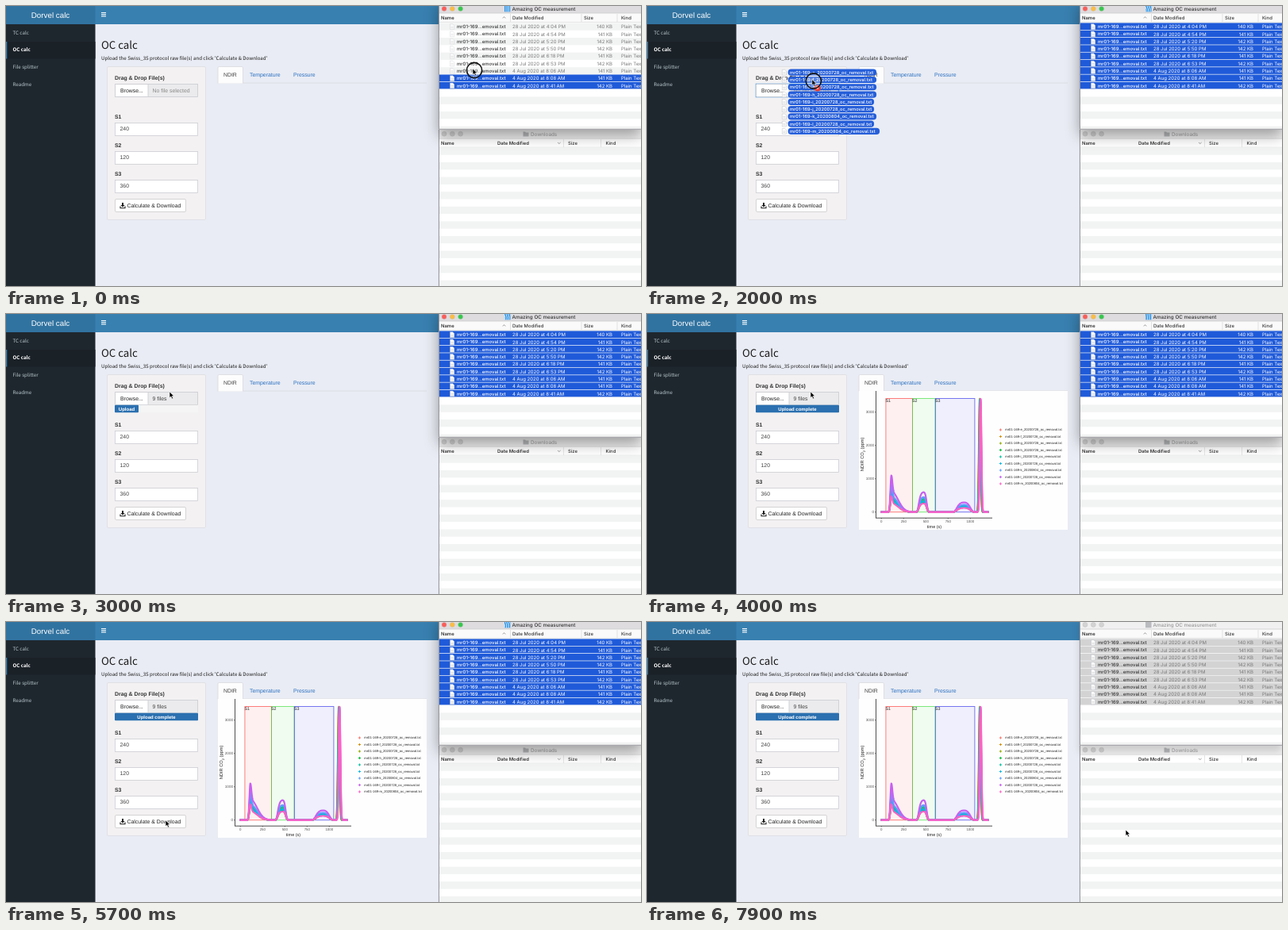
Write an HTML page that moves like this. It is 800 by 353 pixels and loops after 8000 ms.

```html
<!DOCTYPE html>
<html lang="en">
<head>
<meta charset="utf-8">
<title>OC calc</title>
<style>
html, body { margin: 0; width: 100%; height: 100%; overflow: hidden; background: #e9ecf4; }
svg { display: block; width: 800px; height: 353px; }
text { white-space: pre; text-rendering: geometricPrecision; }
.web { font-family: "Liberation Sans", Arial, sans-serif; }
.src { font-family: "Noto Sans CJK JP", "Noto Sans CJK SC", "Noto Sans CJK", "Open Sans", sans-serif; }
.mac { font-family: Inter, Roboto, sans-serif; }
</style>
</head>
<body>
<svg id="stage" viewBox="0 0 800 353" xmlns="http://www.w3.org/2000/svg"></svg>
<script>
const LOOP = 8000, STEP = 100, ROW = 9.3, ROW_TOP = 21.4, SELECTED = '#1f5ad9';
const stage = document.getElementById('stage');
const $ = id => document.getElementById(id);
const range = n => [...Array(n).keys()];

const rect = (x, y, w, h, fill, more = '') =>
  `<rect x="${x}" y="${y}" width="${w}" height="${h}" fill="${fill}" ${more}/>`;
const line = (x1, y1, x2, y2, color, width = 1) =>
  `<path d="M${x1} ${y1}L${x2} ${y2}" stroke="${color}" stroke-width="${width}"/>`;
const text = (face, x, mid, size, str, fill = '#333', more = '') =>
  `<text class="${face}" x="${x}" y="${mid + size * 0.36}" font-size="${size}" fill="${fill}" ${more}>${str}</text>`;
const BOLD = 'font-weight="700"', SEMI = 'font-weight="600"', MEDIUM = 'font-weight="500"';
const MIDDLE = 'text-anchor="middle"', END = 'text-anchor="end"';

// Measurement files
const clock = ['4:04', '4:54', '5:20', '5:50', '6:18', '6:53', '8:06', '8:08', '8:41'];
const sizes = [140, 141, 142, 142, 141, 142, 141, 141, 142];
const files = [...'efghijklm'].map((letter, i) => ({
  letter,
  name: `mr01-169-${letter}_2020${'km'.includes(letter) ? '0804' : '0728'}_oc_removal.txt`,
  date: i < 6 ? `28 Jul 2020 at ${clock[i]} PM` : `4 Aug 2020 at ${clock[i]} AM`,
  size: `${sizes[i]} KB`
}));
const fileIcon = (x, y) =>
  `<path d="M${x} ${y - 3.4}h3.4l1.8 1.8v5h-5.2z" fill="#fff" stroke="#b9bcc2" stroke-width=".5"/>` +
  line(x + 1, y, x + 4, y, '#bbb', .5) + line(x + 1, y + 1.5, x + 4, y + 1.5, '#bbb', .5);

function webPage() {
  const menu = ['TC calc', 'OC calc', 'File splitter', 'Readme'].map((label, i) =>
    text('src', 8.5, 33.5 + i * 21.7, 6.2, label, i === 1 ? '#fff' : '#b8c7ce', i === 1 ? SEMI : '')).join('');
  const field = (label, value, y) =>
    text('web', 137, y - 7.7, 6.9, label, '#333', BOLD) +
    rect(137.5, y + .5, 104, 16, '#fff', 'stroke="#ccced4" stroke-width=".8"') +
    text('web', 143.5, y + 8, 6.9, value, '#444');
  return rect(0, 0, 800, 353, '#e9ecf4') +
    rect(112, 0, 688, 23, '#3880b0') + rect(0, 0, 112.5, 23, '#3173a0') +
    rect(0, 23, 112.5, 330, '#1f272e') + rect(0, 45, 112.5, 21.5, '#1a2127') + rect(0, 45, 1.3, 21.5, '#3880b0') +
    text('web', 56, 11, 9.8, 'Dorvel calc', '#fff', MIDDLE) +
    [8.5, 10.7, 12.9].map(y => line(120, y, 126, y, '#fff', 1.1)).join('') + menu +
    text('src', 120, 49.3, 13.25, 'OC calc', '#1a1a1a') +
    text('src', 120, 65.9, 6.16, "Upload the Swiss_3S protocol raw file(s) and click 'Calculate &amp; Download'", '#1a1a1a') +
    rect(127.5, 76.5, 124, 193, '#f3f1f2', 'rx="1.5" stroke="#dedee2" stroke-width=".8"') +
    text('web', 137, 90.5, 6.9, 'Drag &amp; Drop File(s)', '#333', BOLD) +
    rect(137.5, 98.5, 104, 16, '#ebebed', 'stroke="#c9cbd0" stroke-width=".8" id="fileField"') +
    rect(137.5, 98.5, 41.5, 16, '#fff', 'stroke="#c9cbd0" stroke-width=".8" rx="1"') +
    text('web', 144, 106.3, 6.9, 'Browse...', '#222') + text('web', 184.5, 106.3, 6.9, '', '#777', 'id="fileNote"') +
    `<g id="progress">${rect(137, 114.8, 105, 9.4, '#f5f5f5')}${rect(137, 114.8, 30, 9.4, '#2b70b0', 'rx="1" id="bar"')}
     ${text('web', 152, 119.5, 6, 'Upload', '#fff', MIDDLE + ' id="barLabel" font-weight="700"')}</g>` +
    field('S1', 240, 147) + field('S2', 120, 183) + field('S3', 360, 219) +
    rect(137.5, 243.5, 89, 16, '#fff', 'rx="1.5" stroke="#ccc" stroke-width=".8"') +
    '<path d="M146 248h2v3h1.7l-2.7 2.6-2.7-2.6h1.7z" fill="#222"/><path d="M144 252.5v2.2h6v-2.2" fill="none" stroke="#222" stroke-width="1.1"/>' +
    text('web', 152.5, 251.3, 6.9, 'Calculate &amp; Download', '#222') +
    line(267, 97, 530, 97, '#d8dade', .8) +
    '<path d="M267 97.5V78q0-1.5 1.5-1.5H297q1.5 0 1.5 1.5V97.5" fill="#fdfdfe" stroke="#d8dade" stroke-width=".8"/>' +
    text('web', 274, 86.3, 6.9, 'NDIR', '#444') +
    text('web', 307, 86.3, 6.9, 'Temperature', '#2a6fc0') + text('web', 362, 86.3, 6.9, 'Pressure', '#2a6fc0');
}

// Chart
const px = t => 295.3 + t * 0.112, py = v => 249.7 - v * 0.042;
const bell = (t, mid, width) => Math.exp(-(((t - mid) / width) ** 2));
const hues = ['#F8766D', '#D39200', '#93AA00', '#00BA38', '#00C19F', '#00B9E3', '#619CFF', '#C860F0', '#FF61C3'];

function signal(t, gain, shift) {
  const burn = 620 * bell(t, 112, t < 112 ? 14 : 105) + 480 * bell(t, 112, 16);
  const second = 600 * Math.exp(-(((t - 465) / 48) ** 4)) * (1 - .15 * bell(t, 430, 25));
  const third = 290 * Math.exp(-(((t - 925) / 85) ** 4)) * (.8 + .2 * bell(t, 930, 60));
  return gain * (burn + second + third) + 3400 * bell(t, 1111 + shift, 13);
}

function chart() {
  const zone = (label, from, to, color) =>
    rect(px(from), 106.5, (to - from) * .112, 143.2, color, `fill-opacity=".07" stroke="${color}" stroke-opacity=".65" stroke-width="1"`) +
    text('web', px(from) - .5, 109.5, 5.3, label, '#222');
  const curve = (color, i) => {
    const gain = [.62, .5, .58, .47, .66, .54, .75, 1, .43][i];
    const d = range(401).map(k => `${px(k * 3).toFixed(2)} ${py(signal(k * 3, gain, (i - 4) * 1.4)).toFixed(2)}`).join('L');
    return `<path d="M${d}" fill="none" stroke="${color}" stroke-width="2.2" stroke-linejoin="round" stroke-linecap="round"/>`;
  };
  const xAxis = [0, 250, 500, 750, 1000].map(t => line(px(t), 257, px(t), 258.5, '#333', .6) +
    text('web', px(t), 261.5, 4.4, t, '#555', MIDDLE)).join('');
  const yAxis = [0, 1000, 2000, 3000].map(v => line(287, py(v), 288.5, py(v), '#333', .6) +
    text('web', 286, py(v), 4.6, v, '#555', END)).join('');
  const legend = files.map((f, i) => {
    const y = 146 + i * 8.5;
    return line(443.8, y, 447, y, hues[i], 1) + line(445.4, y - 1.6, 445.4, y + 1.6, hues[i], 1) +
      text('web', 451.3, y, 4.15, f.name, '#222');
  }).join('');
  return rect(267, 97, 263, 175, '#fefefe') +
    zone('S1', 50, 350, '#ff3b3b') + zone('S2', 350, 605, '#3bdd3b') + zone('S3', 608, 1050, '#3030e8') +
    hues.map(curve).join('') + line(288.5, 97, 288.5, 257.5, '#222', .8) + line(288.5, 257.2, 435, 257.2, '#222', .8) +
    xAxis + yAxis + text('web', 362, 267.7, 5.5, 'time (s)', '#222', MIDDLE) +
    `<text class="web" transform="translate(273.3 177) rotate(-90)" font-size="5.7" fill="#222" ${MIDDLE}>NDIR CO<tspan font-size="4" dy="1.2">2</tspan><tspan dy="-1.2"> (ppm)</tspan></text>` +
    legend;
}

// File windows
const lights = (y, id) => [552, 562.3, 572.6].map((x, i) =>
  `<circle id="${id}${i}" cx="${x}" cy="${y}" r="3" fill="#d3d3d3" stroke="#bdbdbd" stroke-width=".4"/>`).join('');
const stripes = (top, bottom) => range(Math.ceil((bottom - top) / ROW)).filter(i => i % 2 === 0).map(i =>
  rect(546, top + i * ROW, 254, Math.min(ROW, bottom - top - i * ROW), '#f2f3f3')).join('');
const heads = (y, cols) => cols.map(([label, x, weight]) => text('mac', x, y, 5.9, label, '#333', weight)).join('');

function downloadsWindow() {
  return rect(545, 156, 255, 197, '#fff') + rect(545, 156, 255, 11, '#f1f0f1') + lights(161.2, 'back') +
    '<path d="M651.5 158.5h2.5l1 1h3.5v5h-7z" fill="#b5b7ba"/>' +
    text('mac', 661, 161.3, 6.3, 'Downloads', '#999') +
    line(545, 167.2, 800, 167.2, '#d5d5d5', .7) + line(545, 178.2, 800, 178.2, '#ddd', .7) +
    [702.5, 749.5].map(x => line(x, 168, x, 178, '#ddd', .7)).join('') +
    heads(172.7, [['Name', 548, SEMI], ['Date Modified', 619, SEMI], ['Size', 708, MEDIUM], ['Kind', 755.5, MEDIUM]]) +
    '<path d="M695 172l1.8 1.6 1.8-1.6" fill="none" stroke="#777" stroke-width=".7"/>' +
    stripes(178.4, 353) + line(545.4, 156, 545.4, 353, '#8e9096');
}

function filesWindow() {
  const rows = files.map((f, i) => {
    const top = ROW_TOP + i * ROW, mid = top + ROW / 2;
    return `<g id="row${i}">${rect(546, top, 254, ROW - .7, 'none')}<g>${fileIcon(559.5, mid)}</g>` +
      text('mac', 568, mid, 5.95, 'mr01-169…emoval.txt', '#333', MEDIUM) + text('mac', 638, mid, 6, f.date) +
      text('mac', 764, mid, 6, f.size, '#333', END) + text('mac', 775, mid, 6, 'Plain Text') + '</g>';
  }).join('');
  return rect(545, -8, 255, 163.5, '#fff') + rect(545, 0, 255, 9, '#dedcdf', 'id="titleBar"') + lights(3.4, 'front') +
    `<g clip-path="url(#folderClip)">${rect(627, 0, 9, 8, '#3a9be8', 'id="folder"')}
     <path id="sheen" fill="none" stroke="#d9f0ff" stroke-width="1"/></g>` +
    text('mac', 637.5, 3.8, 6.25, 'Amazing OC measurement', '#333', MEDIUM + ' id="frontTitle"') +
    rect(545, 9, 255, 11.4, '#fafafa') + line(545, 9, 800, 9, '#c8c8c8', .7) + line(545, 20.4, 800, 20.4, '#ddd', .7) +
    [635.5, 725, 770].map(x => line(x, 10, x, 20, '#d6d6d6', .7)).join('') +
    heads(14.7, [['Name', 548, SEMI], ['Date Modified', 638, MEDIUM], ['Size', 728, MEDIUM], ['Kind', 775, MEDIUM]]) +
    '<path d="M625.7 15.3l1.8-1.6 1.8 1.6" fill="none" stroke="#777" stroke-width=".7"/>' +
    stripes(ROW_TOP, 155) + rows + line(545, 155.3, 800, 155.3, '#8c8d92', .9) + line(545.4, 0, 545.4, 155, '#8e9096');
}

// Dragged labels, placed relative to the pointer tip
function dragGhost() {
  return files.map((f, i) => {
    const y = -8.8 + i * 9.28;
    const w = 111.5 + (f.letter === 'm' ? 4 : 'ijl'.includes(f.letter) ? -3 : 0);
    return fileIcon(-37.5, y) + rect(-30.2, y - 4.1, w, 8.2, SELECTED, 'rx="4"') + text('mac', -27.7, y, 5.7, f.name, '#fff', MEDIUM);
  }).join('') + '<circle cx="7" cy="11" r="4" fill="#ee3b30"/>' + text('mac', 7, 11, 5.5, '9', '#fff', MIDDLE);
}

stage.innerHTML = `<defs>
  <clipPath id="folderClip"><path d="M628 0h7.5v7.3h-7.5z"/></clipPath>
  <filter id="shade" x="-30%" y="-30%" width="160%" height="170%"><feDropShadow id="drop" dx="0" dy="8" stdDeviation="9" flood-opacity=".35"/></filter>
  </defs>
  ${webPage()}<g id="chart">${chart()}</g>${downloadsWindow()}
  <g filter="url(#shade)">${rect(545, -8, 255, 163.5, '#fff')}</g>${filesWindow()}
  <g id="ghost" opacity=".97">${dragGhost()}</g>
  <g id="pointer"><circle id="ring" cx="2" cy="2" r="9.6" fill="#fff" fill-opacity=".25" stroke="#111" stroke-width="1.6"/>
  <path d="M0 0v7.6l1.8-1.6 1.3 2.9 1.4-.6-1.3-2.8h2.4z" fill="#000" stroke="#fff" stroke-width=".6"/></g>`;

const path = [[0, 588, 79], [900, 598, 35], [1100, 598, 35], [1900, 207.8, 92.5], [2300, 207.8, 92.5], [2500, 206, 98],
  [4700, 206, 98], [5600, 201, 250], [6200, 201, 250], [7200, 612, 248], [7700, 603, 262], [LOOP, 603, 262]];

function pointerAt(t) {
  const i = path.findIndex((p, k) => k && t <= p[0]);
  const [a, b] = [path[i - 1], path[i]];
  const u = (t - a[0]) / (b[0] - a[0]), e = u * u * (3 - 2 * u);
  return [a[1] + (b[1] - a[1]) * e, a[2] + (b[2] - a[2]) * e];
}

const set = (id, name, value) => $(id).setAttribute(name, value);
const show = (id, on) => set(id, 'display', on ? 'inline' : 'none');
const within = (t, from, to) => t >= from && t < to;

function paintRows(first, active) {
  files.forEach((_, i) => {
    const [back, icon, ...labels] = $('row' + i).children, on = i >= first;
    back.setAttribute('fill', !on ? 'none' : active ? SELECTED : '#d3d3d4');
    icon.setAttribute('opacity', on ? 1 : .6);
    labels.forEach((label, k) => label.setAttribute('fill', on && active ? '#fff' : k ? '#777' : '#333'));
  });
}

function draw(t) {
  const [x, y] = pointerAt(t);
  const active = t < 5900, dropped = t >= 2400, done = t >= 3300;
  set('pointer', 'transform', `translate(${x} ${y})`);
  set('ghost', 'transform', `translate(${x} ${y})`);
  show('ghost', within(t, 1200, 2400));
  show('ring', t < 850 || within(t, 1100, 2400) || within(t, 5800, 6100));
  paintRows(t < 900 ? Math.round((y - 35) / 44 * 7) : 0, active);

  const lit = active ? ['#fc5b57', '#fdbc40', '#34c84a'] : Array(3).fill('#d3d3d3');
  lit.forEach((color, i) => set('front' + i, 'fill', color));
  set('titleBar', 'fill', active ? '#dedcdf' : '#f1f0f1');
  set('frontTitle', 'fill', active ? '#333' : '#999');
  set('folder', 'fill', active ? '#2b8fe2' : '#b9bbbe');
  show('sheen', active);
  const phase = t / 100, lean = 2.5 * Math.sin(phase * .7);
  set('sheen', 'd', range(6).map(i => `M${625 + i * 2.5 + phase % 2.5} 0q${lean} 4 ${lean / 2} 8`).join(''));
  set('drop', 'flood-opacity', active ? .35 : .15);
  set('drop', 'stdDeviation', active ? 9 : 5);

  const hover = within(t, 1500, 2400);
  set('fileField', 'stroke', hover ? '#5aa5e8' : '#c9cbd0');
  set('fileField', 'stroke-width', hover ? 1.6 : .8);
  $('fileNote').textContent = dropped ? '9 files' : 'No file selected';
  set('fileNote', 'fill', dropped ? '#444' : '#888');
  show('progress', t >= 2700);
  const width = done ? 105 : 30;
  set('bar', 'width', width);
  set('barLabel', 'x', 137 + width / 2);
  $('barLabel').textContent = done ? 'Upload complete' : 'Upload';
  show('chart', t >= 3800);
}

const start = performance.now();
function tick(now) {
  const t = Math.max(0, now - start) % LOOP;
  draw(Math.floor(t / STEP) * STEP);
  requestAnimationFrame(tick);
}
draw(0);
requestAnimationFrame(tick);
</script>
</body>
</html>
```
